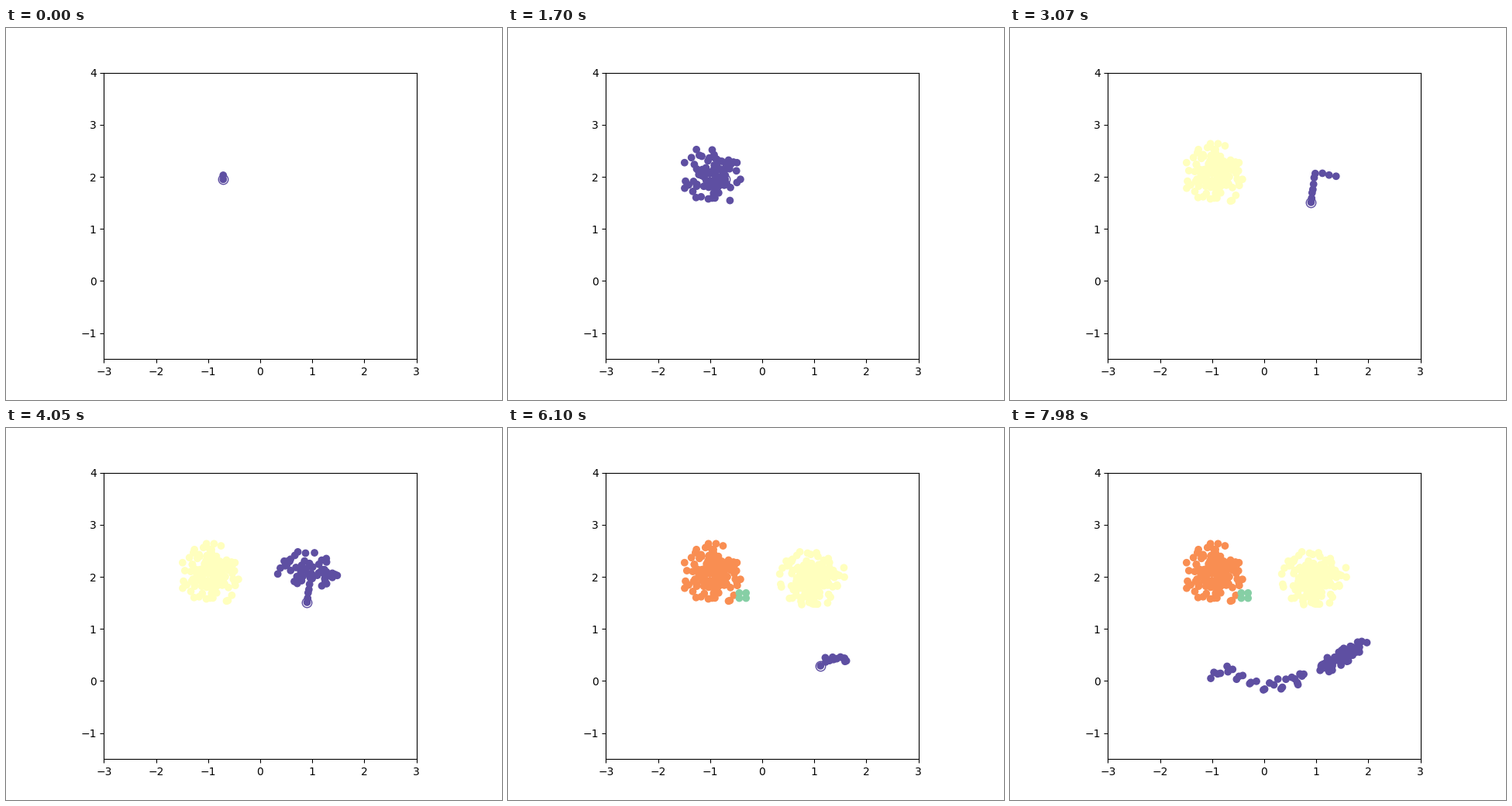
These frames come from a looping animation (640x480 px, 8 s). A matplotlib script:

```python
import itertools
import math
import random

import matplotlib.pyplot as plt
import numpy as np
from matplotlib.animation import FuncAnimation

FRAMES, INTERVAL = 400, 20
REACH = 0.3  # neighbourhood radius
rng = random.Random(7)

path = []    # points in the order they are visited
labels = []  # cluster number of each visited point


def visit(label, points):
    path.extend(points)
    labels.extend([label] * len(points))


def cloud(n, center, radii, slope=0.0):
    """Random ellipse, denser towards its middle, sheared by slope."""
    points = []
    for k in range(n):
        r = ((k + 0.5) / n) ** 0.75
        a = rng.uniform(0, math.tau)
        dx, dy = radii[0] * r * math.cos(a), radii[1] * r * math.sin(a)
        points.append((center[0] + dx, center[1] + dy + slope * dx))
    return points


def trail(n, keys, jitter):
    """Evenly timed steps along a polyline, starting exactly on its first key."""
    at = np.linspace(0, len(keys) - 1, n)
    xs, ys = (np.interp(at, range(len(keys)), c) for c in zip(*keys))
    return [(x + 0.3 * rng.uniform(-d, d), y + rng.uniform(-d, d))
            for x, y, d in zip(xs, ys, [0] + [jitter] * (n - 1))]


def walk(points):
    """Hop to a random unvisited neighbour, or the nearest point if none."""
    left, pos, order = list(points), path[-1], []
    while left:
        near = [p for p in left if math.dist(p, pos) < REACH]
        pos = rng.choice(near) if near else min(left, key=lambda p: math.dist(p, pos))
        left.remove(pos)
        order.append(pos)
    return order


def explore(label, *shape):
    visit(label, walk(cloud(*shape)))


# upper left blob: left side, right side, top, then the fringe
visit(1, [(-0.71, 1.95), (-0.71, 2.03)])
explore(1, 40, (-1.08, 2.05), (0.48, 0.53))
explore(1, 41, (-0.82, 1.92), (0.48, 0.50))
explore(1, 41, (-1.00, 2.16), (0.50, 0.42))
explore(1, 21, (-0.88, 2.03), (0.58, 0.64))

# upper right blob: spine, right edge, top, then downwards
visit(2, trail(10, [(0.90, 1.51), (0.93, 1.78), (0.98, 2.06), (1.38, 2.01)], 0.03))
explore(2, 11, (1.28, 2.12), (0.22, 0.28))
explore(2, 40, (0.80, 2.09), (0.60, 0.42))
explore(2, 34, (1.04, 1.87), (0.42, 0.44))
explore(2, 36, (0.80, 1.87), (0.46, 0.46))
explore(2, 15, (1.08, 1.95), (0.54, 0.62))

# small group
visit(3, list(itertools.product((-0.44, -0.31), (1.69, 1.59))))

# lower blob, then the long arm to the left
visit(4, [(1.12, 0.29)])
explore(4, 11, (1.38, 0.40), (0.27, 0.15), 0.2)
explore(4, 14, (1.68, 0.56), (0.30, 0.12), 0.6)
explore(4, 43, (1.50, 0.46), (0.43, 0.17), 0.6)
explore(4, 9, (1.20, 0.32), (0.20, 0.13), 0.4)
visit(4, trail(28, [(0.76, 0.13), (0.60, 0.00), (0.32, -0.05), (0.00, -0.12),
                    (-0.40, 0.03), (-0.70, 0.27), (-1.04, 0.08)], 0.11))

points = np.array(path)
labels = np.array(labels)

fig, ax = plt.subplots(figsize=(6.4, 4.8), dpi=100)
ax.set_aspect("equal")
ax.set_xlim(-3, 3)
ax.set_ylim(-1.5, 4)
cmap = plt.get_cmap("Spectral")
dots = ax.scatter([], [], s=36)
ring, = ax.plot([], [], "o", ms=9, mfc="none", mec=cmap(1.0), mew=1, zorder=0.9)


def update(i):
    seen = labels[:i + 2]
    newest = seen[-1]
    dots.set_offsets(points[:i + 2])
    dots.set_color(cmap(seen / newest))
    start = np.argmax(labels == newest)
    ring.set_data(points[start:start + 1].T)
    return dots, ring


anim = FuncAnimation(fig, update, frames=FRAMES, interval=INTERVAL,
                     init_func=lambda: update(0), repeat=True, repeat_delay=0)
plt.show()
```
